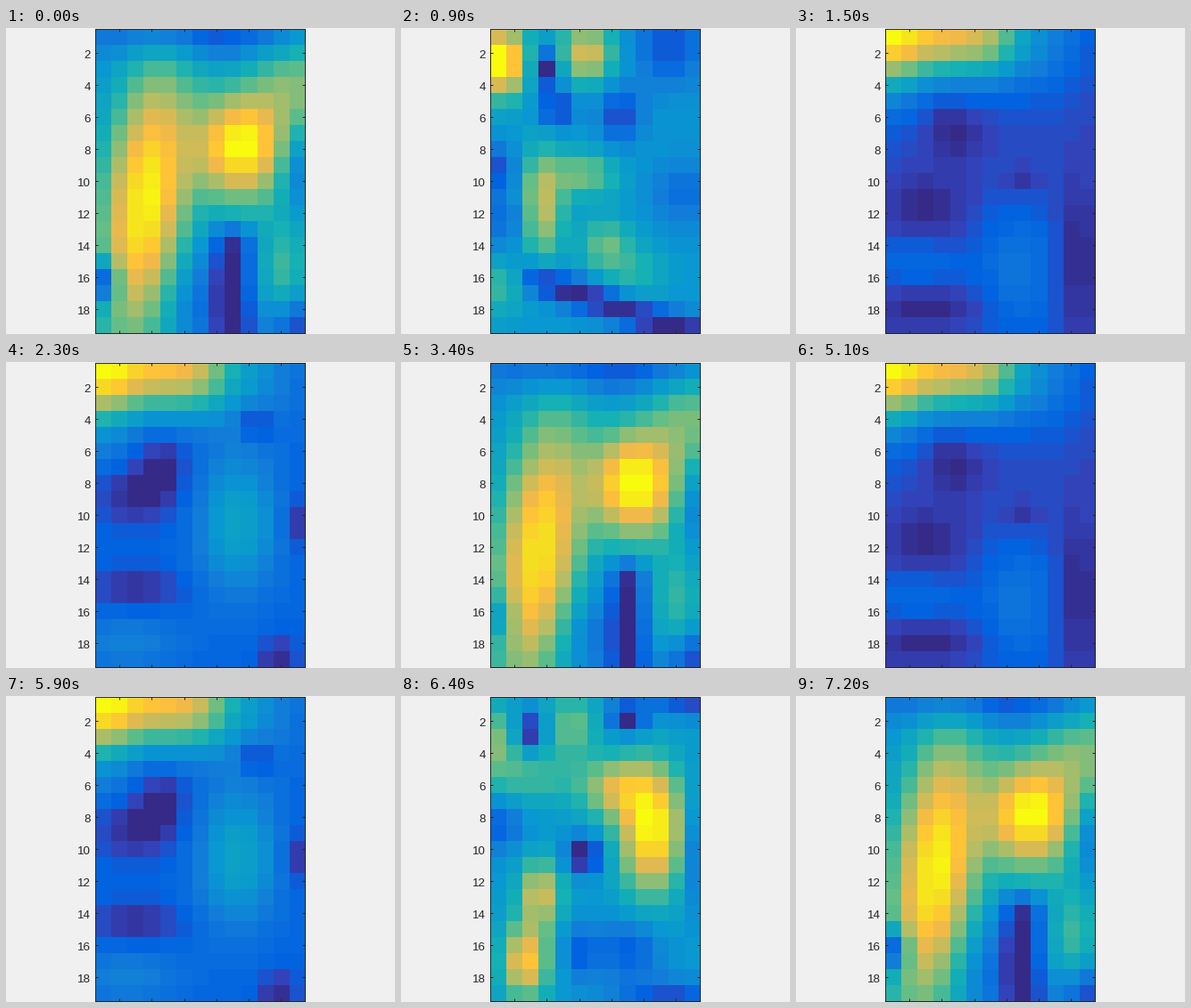
A matplotlib script that plays this animation: 436 px wide and 344 px high, repeating every 7.3 s.

```python
import numpy as np
import matplotlib.pyplot as plt
from matplotlib.animation import FuncAnimation
from matplotlib.colors import LinearSegmentedColormap

W, H, DPI = 436, 344, 100
COLS, ROWS = 13, 19
FRAMES, STEP, CYCLE = 73, 100, 36
PX = 72 / DPI
INK = "#262626"
CMAP = LinearSegmentedColormap.from_list("heat", [
    (0, "#352a87"), (4 / 63, "#3243ba"), (8 / 63, "#0363e1"),
    (14 / 63, "#127dd8"), (20 / 63, "#0998d1"), (28 / 63, "#15b1b4"),
    (36 / 63, "#65be86"), (44 / 63, "#b7bd64"), (51 / 63, "#f1b94a"),
    (54 / 63, "#ffc337"), (59 / 63, "#f5de21"), (1, "#f9fb0e")], N=64)

Y, X = np.mgrid[1:ROWS + 1, 1:COLS + 1].astype(float)


def bell(d, width):
    return np.exp(-0.5 * (d / width) ** 2)


def rise(d, softness=0.35):
    return 1 / (1 + np.exp(-d / softness))


def spot(amp, x, y, sx, sy=None):
    """A warm (positive) or cool (negative) soft spot."""
    return amp * bell(X - x, sx) * bell(Y - y, sy or sx)


def ramp(t, start, end):
    return np.clip((t - start) / (end - start), 0, 1)


def twin_peaks(u):
    """Slanted left ridge, round right peak and a dark stripe below it."""
    slant = 4.4 - 0.11 * (Y - 4)
    ridge = 65 * bell(X - slant, 1.8) * bell(Y - 12.3 + u, 6)
    stripe = -32 * bell(X - 9, 0.8 + 0.2 * u) * rise(Y - 13)
    return (30 + ridge + stripe
            + spot(73 - 6 * u, 9.5, 8.1 - 0.2 * u, 1.9, 2.3)
            + spot(28, 13, 4, 2, 2.2)
            + spot(-15, 13, 9.2, 0.8, 2)
            + spot(-24, 7, 0.5, 5, 1.4)
            + spot(20, 12, 15.5, 1.2, 2.5)
            + spot(-25, 13, 19, 1.3)
            + spot(-12, 6.5, 17.5, 1.3, 2)
            + spot(-20 - 20 * u, 1, 16.3, 0.7, 1))


def scattered():
    """Hot corner, small islands and a dark diagonal along the bottom."""
    diagonal = 16.2 + 0.35 * (X - 3.5)
    return (33 - 32 * bell(Y - diagonal, 0.75) * rise(X - 2.6)
            + spot(72, 1.2, 2.5, 1.1, 1.5)
            + spot(45, 6.4, 2, 1.2, 1.3)
            + spot(-38, 4, 3, 0.6, 0.9)
            + spot(-28, 4.6, 5.5, 0.8)
            + spot(-22, 11.5, 1.5, 1.5, 1.8)
            + spot(-25, 8.5, 5.9, 0.9, 1.2)
            + spot(-22, 1, 9.2, 0.8, 1)
            + spot(40, 3.7, 11.5, 0.9, 2.4)
            + spot(27, 6.3, 9.6, 1.4, 1)
            + spot(25, 7.6, 14, 1.1, 1.2)
            + spot(-16, 1.5, 12.3, 1, 1.2)
            + spot(-14, 12.5, 10.8, 1.5)
            + spot(18, 1, 16.7, 1, 1.2)
            + spot(14, 9.5, 15.8, 1.3))


def top_edge(v):
    """Hot band at the top over a dark field whose spots drift."""
    band = 72 * rise(8 - X, 0.9) * bell(Y - 0.8, 1.9)
    return (9 + 5 * v + band
            + spot(19, 1, 2, 1.2, 2.8)
            + spot(14, 10, 1, 2, 2.5)
            + spot(12 + 12 * v, 8.8 + 0.5 * v, 15.5 - 5 * v, 1.7, 3)
            + spot(8 + 3 * v, 2.5, 15.2 + 2.8 * v, 2.3, 1.1)
            + spot(-7 - 7 * v, 3, 11.5 - 2.7 * v, 1.6, 1.2)
            + spot(-8 - 6 * v, 4.7, 6.8, 1, 1.2)
            + spot(-8 - 4 * v, 12.3 - 0.6 * v, 15 + 4 * v, 0.8, 3 - 2 * v)
            + spot(-8 - 4 * v, 3, 17.8 - 3.3 * v, 1.9, 0.8)
            + spot(-6 - 10 * v, 9 + 1.4 * v, 10 - 5.7 * v, 0.7)
            + spot(-12 * v, 13, 10.5, 0.6, 1.1))


def right_peak():
    """Tall peak on the right, a leg on the left and dark pits between."""
    return (34
            + spot(64, 10.5, 8.8, 1.4, 2.7)
            + spot(36, 8.2, 6.2, 1.5, 1.3)
            + spot(-18, 13.2, 10, 0.7, 2.5)
            + spot(24, 5.5, 2.3, 1.1, 1.4)
            + spot(26, 1, 3.2, 0.8, 1.5)
            + spot(18, 3, 5.5, 2, 1.2)
            + spot(-34, 3, 2.6, 0.6, 0.8)
            + spot(-32, 9, 1.8, 0.8, 0.7)
            + spot(-25, 13, 0.6, 2, 0.8)
            + spot(-18, 1, 8.5, 1.1)
            + spot(-38, 6.3, 10.4, 0.8)
            + spot(42, 3.6, 12.8, 0.9, 1.5)
            + spot(52, 2.7, 17, 1, 1.6)
            + spot(-18, 6, 16.4, 0.8, 1.2)
            + spot(-20, 9, 16.3, 1.4, 1.3)
            + spot(-22, 11.5, 19.3, 2.3, 0.8))


def heat_at(n):
    t = n % CYCLE
    lift = 1 if t < 9 else ramp(t, 34, CYCLE)
    scenes = [
        (np.interp(t, [0, 9, 28, 34], [1, 0, 0, 1]), twin_peaks(lift)),
        (np.interp(t, [0, 9, 15], [0, 1, 0]), scattered()),
        (np.interp(t, [9, 15, 23, 28], [0, 1, 1, 0]),
         top_edge(ramp(t, 15, 23))),
        (np.interp(t, [23, 28, 34], [0, 1, 0]), right_peak()),
    ]
    grid = sum(share * np.clip(scene, 0, 100) for share, scene in scenes)
    return (grid - grid.min()) / (grid.max() - grid.min())


plt.rcParams["font.family"] = "Liberation Sans"
fig = plt.figure(figsize=(W / DPI, H / DPI), dpi=DPI, facecolor="#f0f0f0")
ax = fig.add_axes([100.2 / W, 0.8 / H, 235 / W, 342 / H])
image = ax.imshow(heat_at(0), cmap=CMAP, vmin=0, vmax=1, aspect="auto",
                  interpolation="nearest",
                  extent=(0.5, COLS + 0.5, ROWS + 0.5, 0.5))
ax.set_xticks(range(2, COLS, 2))
ax.set_yticks(range(2, ROWS, 2))
ax.tick_params(direction="in", length=3 * PX, width=PX, color=INK, top=True,
               right=True, labelbottom=False, labelleft=False)
for row in range(2, ROWS, 2):
    ax.annotate(str(row), (0, row), xycoords=ax.get_yaxis_transform(),
                xytext=(-5.5 * PX, -1.5 * PX), textcoords="offset points",
                ha="right", va="center_baseline", size=9.6, color=INK)
for spine in ax.spines.values():
    spine.set(linewidth=PX, edgecolor=INK)


def draw(n):
    image.set_data(heat_at(n))
    return [image]


anim = FuncAnimation(fig, draw, frames=FRAMES, interval=STEP, repeat=True,
                     repeat_delay=0)
plt.show()
```
